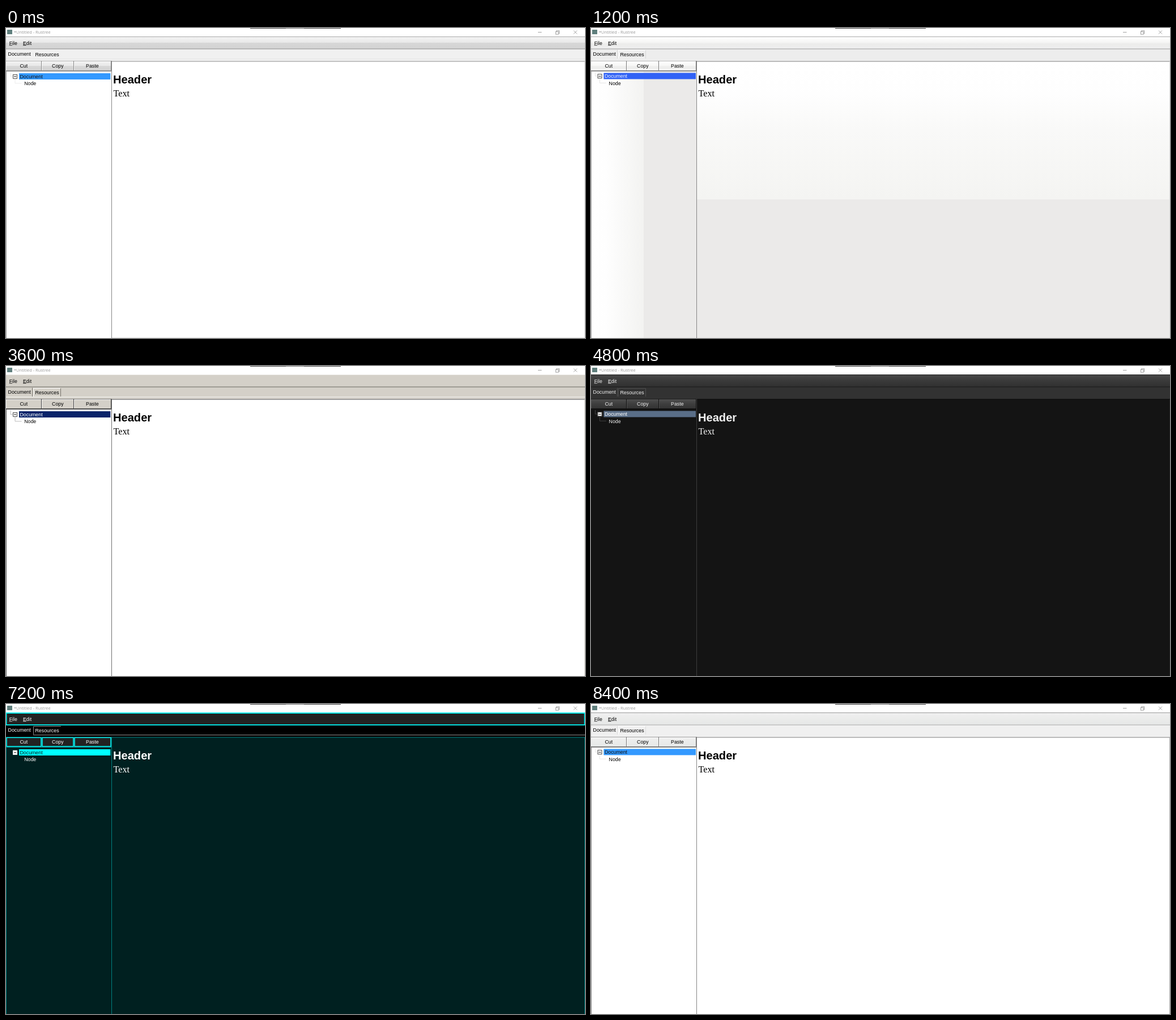
These frames come from a looping animation (1022 by 548 pixels, 9.6 s). An HTML page with a canvas:

```html
<!DOCTYPE html>
<html lang="en">
<head>
<meta charset="utf-8">
<title>Theme cycle</title>
<style>
html, body { margin: 0; width: 100%; height: 100%; overflow: hidden; background: #fff; }
canvas { display: block; width: 1022px; height: 548px; }
</style>
</head>
<body>
<canvas id="stage"></canvas>
<script>
const W = 1022, H = 548, STEP = 1200;
const SANS = '"Liberation Sans", Arial, sans-serif';
const SERIF = '"Liberation Serif", "Times New Roman", serif';
const canvas = document.getElementById('stage');
const ratio = window.devicePixelRatio || 1;
canvas.width = Math.round(W * ratio);
canvas.height = Math.round(H * ratio);
const ctx = canvas.getContext('2d');
ctx.scale(ratio, ratio);

// bar, button, tree and page are gradient stops: [position, colour, ...]
const base = {
  inset: 0, text: '#000', selText: '#111', tree: [0, '#fff'], page: [0, '#fff'],
  light: '#fff', wire: '#d8d8d8', right: '#e0e0e0', foot: '', divider: '#858585',
  tabEdge: '', tabLine: '', barEdge: ['#aaa', '#999']
};
const themes = [
  { // Aero
    inset: 0.6, bg: '#f0f0f0', sel: '#3399ff', edge: '#858585', frame: '#a0a0a0',
    bar: [0, '#f4f4f4', .5, '#e8e8e8', .52, '#d7d7d7', 1, '#d2d2d2'],
    button: [0, '#f2f2f2', .5, '#e8e8e8', .52, '#d8d8d8', 1, '#d0d0d0'],
    tabLine: '#e4e4e4', foot: '#e8e8e8', wire: '#e4e4e4', barEdge: ['#a8a8a8', '#909090']
  },
  { // Aqua Classic
    bg: '#ededed', sel: '#3062f6', selText: '#eef3ff', edge: '#777', frame: '#aaa',
    bar: [0, '#fff', .45, '#f6f6f5', .6, '#ececeb', 1, '#eee'],
    button: [0, '#fff', .45, '#f7f7f6', .6, '#ececeb', 1, '#f4f4f4'],
    tree: [0, '#fff', .14, '#fefefe', .5, '#f3f3f1', .501, '#ebeae9', 1, '#ebeae9'],
    page: [0, '#fff', .12, '#fefefe', .25, '#f9f9f8', .5, '#f4f4f2', .501, '#ebeae9', 1, '#ebeae9'],
    tabEdge: '#d6d6d6'
  },
  { // Blue
    bg: '#d3e4fe', sel: '#3399ff', edge: '#7b93b8', frame: '#8aa5cc', divider: '#7b93b8',
    bar: [0, '#e6f0ff', .5, '#d3e4fe', 1, '#bdd4f6'],
    button: [0, '#e8f1ff', .5, '#d3e4fe', 1, '#bdd4f6'],
    tabEdge: '#a9c0e4', barEdge: ['#9ab4d8', '#8aa5cc']
  },
  { // Classic
    inset: 0.6, bg: '#d4d0c8', sel: '#0a246a', selText: '#fff', edge: '#404040', frame: '#666',
    bar: [0, '#d4d0c8'], button: [0, '#d4d0c8'], divider: '#707070', wire: '#a0a0a0',
    tabEdge: '#77736c', tabLine: '#f6f5f3', barEdge: ['#eeece8', '#6a6863'], right: '#d4d0c8'
  },
  { // Dark
    bg: '#323232', text: '#f0f0f0', selText: '#fff', sel: '#5a6e88', edge: '#111', frame: '#111',
    bar: [0, '#484848', .5, '#3a3a3a', 1, '#303030'],
    button: [0, '#505050', .5, '#3e3e3e', 1, '#323232'],
    tree: [0, '#141414'], page: [0, '#141414'], light: '#555', wire: '#555', right: '#222',
    divider: '#3c3c3c', tabEdge: '#505050', barEdge: ['#222', '#181818']
  },
  { // Greybird
    bg: '#cecece', text: '#3c3c3c', selText: '#252b33', sel: '#4c9ff2', edge: '#777', frame: '#888',
    bar: [0, '#d8d8d8', 1, '#cacaca'], button: [0, '#d9d9d9', 1, '#cecece'],
    tree: [0, '#fcfcfc'], page: [0, '#fcfcfc'], light: '#e0e0e0', wire: '#999', right: '#f4f4f4',
    barEdge: ['#bbb', '#a6a6a6']
  },
  { // High Contrast
    inset: 0.6, bg: '#000', text: '#fff', selText: '#062020', sel: '#00ffff', edge: '#00ffff', frame: '#008080',
    bar: [0, '#222'], button: [0, '#222'], tree: [0, '#002020'], page: [0, '#002020'],
    light: '#002020', wire: '#002020', right: '#008080', divider: '#008080',
    tabEdge: '#888', tabLine: '#999', barEdge: ['#00ffff', '#00ffff'], outlined: true
  },
  { // Metro
    bg: '#f0f0f0', sel: '#3399ff', edge: '#777', frame: '#888',
    bar: [0, '#f0f0f0', 1, '#e5e7e6'], button: [0, '#f0f0f0', 1, '#e5e8e7'],
    tabEdge: '#dedede', wire: '#e0e0e0', right: '#aaa', barEdge: ['#999', '#aaa']
  }
].map(theme => ({ ...base, ...theme }));

function box(x, y, w, h, color) {
  ctx.fillStyle = color;
  ctx.fillRect(x, y, w, h);
}

function shade(x, y, w, h, stops, across = false) {
  const fill = ctx.createLinearGradient(x, y, across ? x + w : x, across ? y : y + h);
  for (let i = 0; i < stops.length; i += 2) fill.addColorStop(stops[i], stops[i + 1]);
  box(x, y, w, h, fill);
}

function outline(x, y, w, h, color, width = 1) {
  ctx.strokeStyle = color;
  ctx.lineWidth = width;
  ctx.strokeRect(x + width / 2, y + width / 2, w - width, h - width);
}

function line(color, width, ...points) {
  ctx.strokeStyle = color;
  ctx.lineWidth = width;
  ctx.beginPath();
  for (let i = 0; i < points.length; i += 2) ctx.lineTo(points[i], points[i + 1]);
  ctx.stroke();
}

function label(text, x, y, color, font = `8.8px ${SANS}`, align = 'left') {
  ctx.font = font;
  ctx.fillStyle = color;
  ctx.textAlign = align;
  ctx.fillText(text, x, y);
}

function drawTitleBar() {
  box(0, 0, W, 15, '#fff');
  box(2, 3, 9, 8, '#5f7f7d');
  label('*Untitled - Rustree', 14, 10.3, '#999', '7.45px "Open Sans", sans-serif');
  box(431, 0, 160, 1, '#444');
  box(494, 0, 32, 1, '#777');
  const ink = '#8a8a8a';
  line(ink, 0.8, 939, 7.5, 945.5, 7.5);
  outline(970, 6, 5.5, 5.5, ink, 0.8);
  line(ink, 0.8, 971.5, 6, 971.5, 4.7, 976.7, 4.7, 976.7, 10, 975.5, 10);
  line(ink, 0.8, 1002, 4.5, 1008, 10.5);
  line(ink, 0.8, 1008, 4.5, 1002, 10.5);
}

function drawMenu(t) {
  shade(0, 15, W, 22, t.bar);
  box(0, 15, W, 1, t.barEdge[0]);
  box(0, 36.5, W, 1, t.barEdge[1]);
  if (t.outlined) outline(0, 15.5, W, 22, t.edge, 1.4);
  for (const [text, x, width] of [['File', 5.7, 5.4], ['Edit', 30, 5.8]]) {
    label(text, x, 29.5, t.text);
    box(x, 30.4, width, 0.7, t.text);
  }
}

function drawTabs(t) {
  if (t.tabLine) {
    box(t.outlined ? 48 : 0, 54.3, W, 1, t.tabLine);
  }
  if (t.tabEdge) {
    if (t.outlined) {
      line(t.tabEdge, 1, 48.5, 54, 48.5, 39.5, 97, 39.5);
    } else {
      line(t.tabEdge, 1, 46.5, 38.5, 46.5, 54);
      line(t.light, 0.8, 48.5, 54, 48.5, 39.5, 96, 39.5);
      line(t.tabEdge, 1, 96.5, 39.5, 96.5, 54);
    }
  }
  label('Document', 3.6, 49.1, t.text);
  label('Resources', 51.5, 50, t.text);
}

function drawButtons(t) {
  for (const [text, x, w, center] of [['Cut', 0, 63, 31.3], ['Copy', 63, 57, 91.3], ['Paste', 120, 66, 152.3]]) {
    shade(x, 58, w, 18, t.button);
    if (t.outlined) {
      outline(x + 0.3, 58.6, w - 0.6, 17.2, t.edge, 1.5);
    } else {
      box(x, 58, w, 0.8, t.frame);
      box(x, 59, w, 0.8, t.light);
      box(x, 59, 0.8, 16, t.light);
      box(x + w - 1, 58, 1, 18, t.edge);
      box(x, 75, w, 1, t.edge);
    }
    label(text, center, 69.8, t.text, undefined, 'center');
  }
}

function drawTree(t) {
  const d = t.inset;
  shade(0, 76, 186, H - 76, t.tree, true);
  box(0, 76, 1, H - 76, t.frame);
  box(0, 76, 186, 1, t.frame);
  line(t.wire, 0.7, 7.5 + d, 78, 7.5 + d, 85 + d, 11 + d, 85 + d);
  line(t.wire, 0.7, 15.4 + d, 90, 15.4 + d, 97.2 + d, 27 + d, 97.2 + d);
  box(22.4 + d, 79.4 + d, 162.6 - 2 * d, 11, t.sel);
  box(11.6 + d, 81.3 + d, 7.8, 7.8, '#fff');
  outline(11.6 + d, 81.3 + d, 7.8, 7.8, t.outlined ? '#fff' : '#222', 0.8);
  box(13.4 + d, 84.8 + d, 4.2, 0.9, '#000');
  label('Document', 23.9 + d, 88.2 + d, t.selText);
  label('Node', 31.6 + d, 100.5 + d, t.text);
}

function drawPage(t) {
  shade(187, 58, W - 187, H - 58, t.page);
  box(185, 58, 2, H - 58, t.divider);
  box(187, 58.5, W - 187, 1, t.outlined ? t.divider : t.edge);
  box(W - 1, 59, 1, H - 59, t.right);
  if (t.foot) box(187, H - 1, W - 187, 1, t.foot);
  label('Header', 189, 98.3, t.text, `bold 20.1px ${SANS}`);
  label('Text', 189.4, 120.5, t.text, `16.3px ${SERIF}`);
}

function draw(theme) {
  box(0, 0, W, H, theme.bg);
  for (const part of [drawTitleBar, drawMenu, drawTabs, drawPage, drawTree, drawButtons]) part(theme);
}

const start = performance.now();
let shown = -1;
function tick() {
  const index = Math.floor((performance.now() - start) / STEP) % themes.length;
  if (index !== shown) draw(themes[shown = index]);
  requestAnimationFrame(tick);
}
tick();
</script>
</body>
</html>
```
